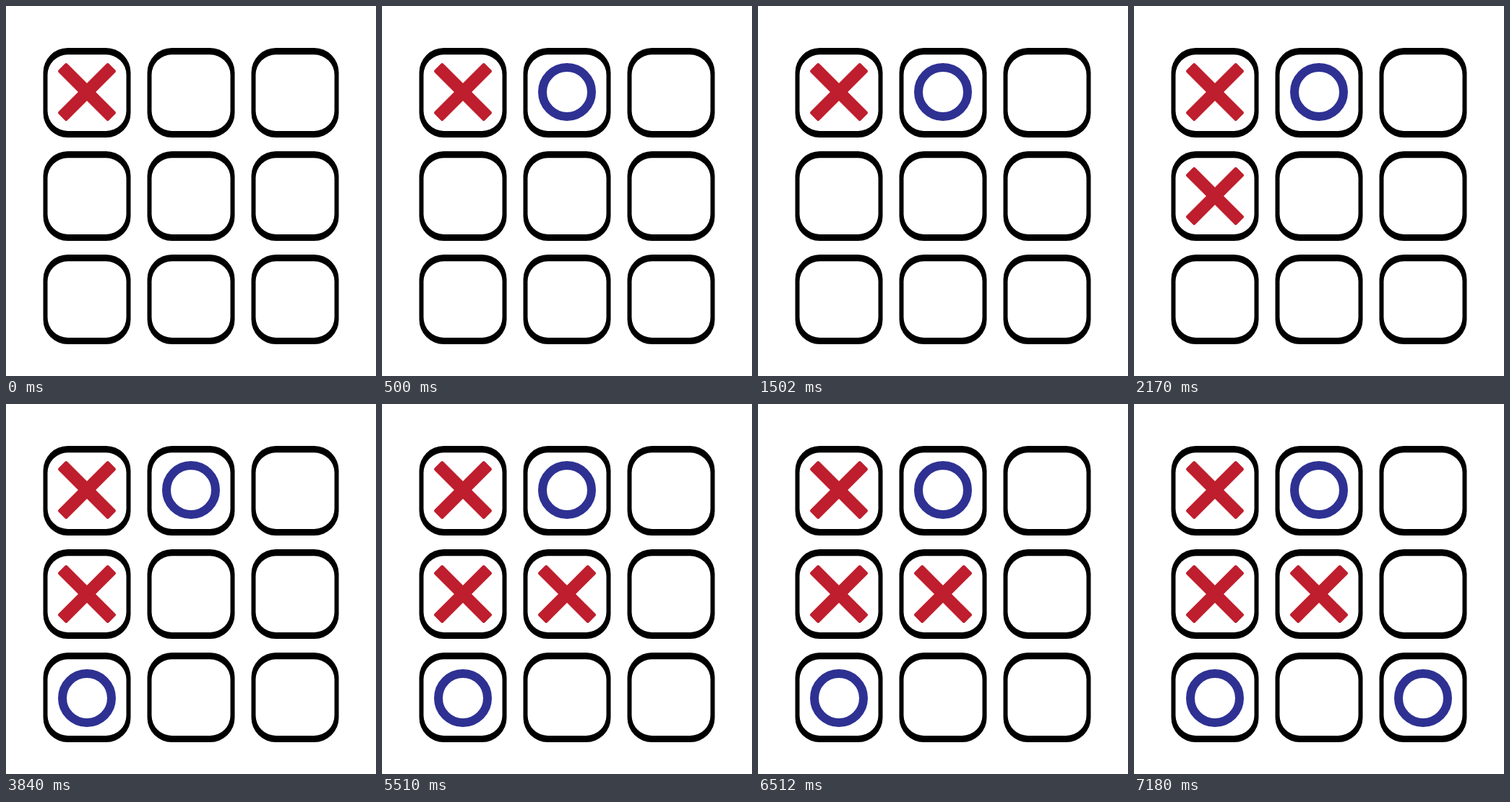
Write an HTML page that moves like this. It is 512 px wide and 512 px high and loops after 8000 ms.

```html
<!DOCTYPE html>
<html lang="en">
<head>
<meta charset="utf-8">
<title>Noughts and crosses</title>
<style>
  html, body { margin: 0; height: 100%; overflow: hidden; background: #fff; }
  svg { display: block; width: 100%; height: 100%; }
</style>
</head>
<body>
<svg viewBox="0 0 512 512">
  <defs>
    <g id="cell">
      <rect x="51.5" y="58" width="121" height="124" rx="34"/>
      <rect x="57.5" y="67.3" width="109" height="105.7" rx="28" fill="#fff"/>
    </g>
    <g id="x" fill="#be1e2d">
      <rect x="-49.2" y="-8.5" width="98.4" height="17" rx="2" transform="rotate(45)"/>
      <rect x="-49.2" y="-8.5" width="98.4" height="17" rx="2" transform="rotate(-45)"/>
    </g>
    <circle id="o" r="34" fill="none" stroke="#2e3192" stroke-width="12"/>
  </defs>
</svg>
<script>
const LOOP = 8000;
const svg = document.querySelector('svg');

// [mark, column, row, time it appears]
const moves = [
  ['x', 0, 0, 0],
  ['o', 1, 0, 500],
  ['x', 0, 1, 2170],
  ['o', 0, 2, 3840],
  ['x', 1, 1, 5510],
  ['o', 2, 2, 7180]
];

function place(id, x, y) {
  const use = document.createElementNS('http://www.w3.org/2000/svg', 'use');
  use.setAttribute('href', '#' + id);
  use.setAttribute('x', x);
  use.setAttribute('y', y);
  return svg.appendChild(use);
}

for (let row = 0; row < 3; row++)
  for (let col = 0; col < 3; col++) place('cell', col * 144, row * 143);

const marks = moves.map(([id, col, row, start]) =>
  ({ start, el: place(id, 112 + col * 144, 119 + row * 144) }));

const begin = performance.now();

function draw(now) {
  const t = Math.max(0, now - begin) % LOOP;
  for (const { el, start } of marks)
    el.setAttribute('visibility', t >= start ? 'visible' : 'hidden');
  requestAnimationFrame(draw);
}
draw(begin);
</script>
</body>
</html>
```
